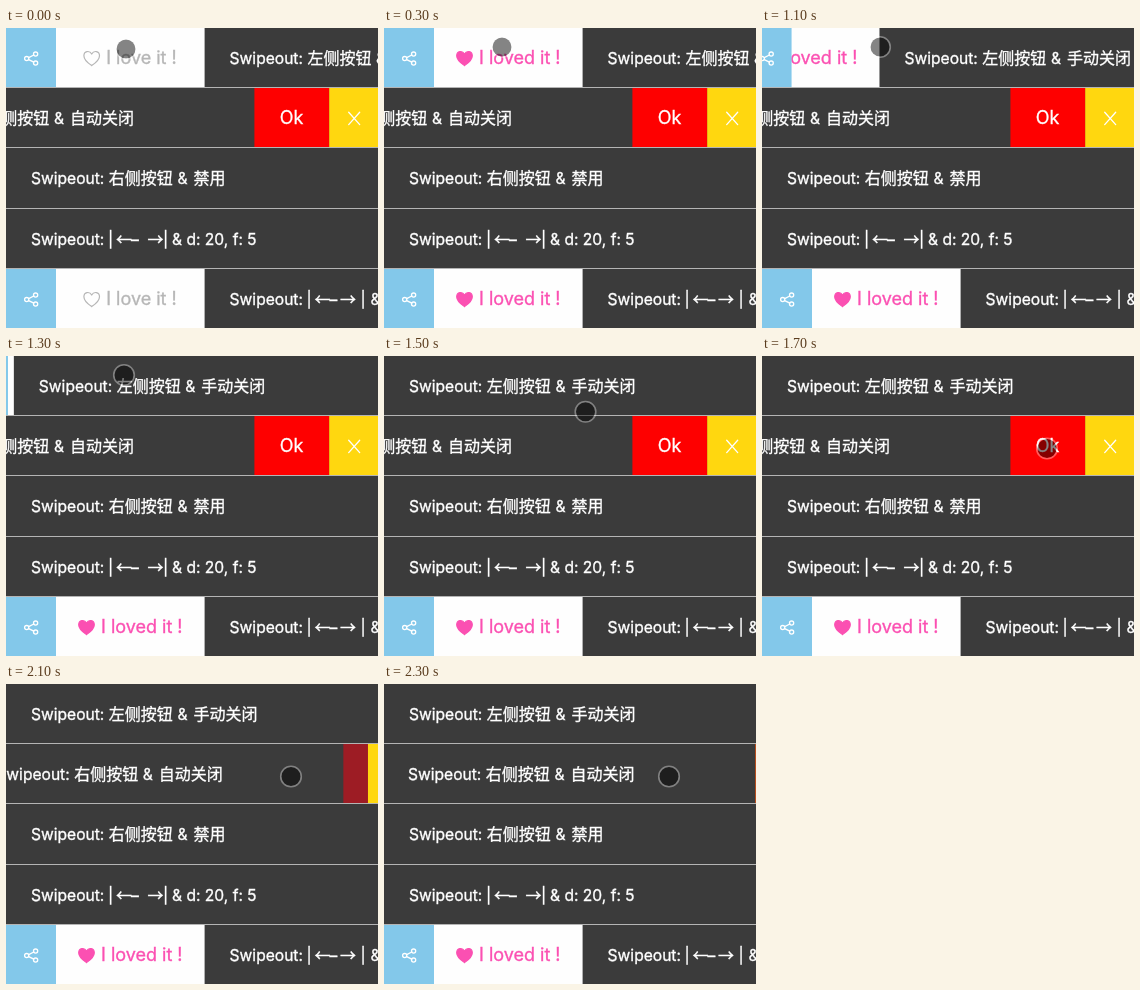
Recreate the animation shown at these times as an HTML page with a canvas. Size 372x300 px, loop 2.4 s.

```html
<!DOCTYPE html>
<html lang="zh-CN">
<head>
<meta charset="utf-8">
<title>Swipeout</title>
<style>
html, body { margin: 0; width: 100%; height: 100%; overflow: hidden; background: #3b3b3b; }
canvas { display: block; }
</style>
</head>
<body>
<canvas id="stage" width="372" height="300"></canvas>
<script>
const ctx = document.getElementById('stage').getContext('2d');
const W = 372, LOOP = 2400, STEP = 100;
const LEFT = 198.6, RIGHT = 123.6, PITCH = 60.3, ROW = 59;
const LATIN = 'Inter, sans-serif';
const HAN = '"Noto Sans CJK SC", "Noto Sans CJK", sans-serif';
const PINK = '#fb50b2', GREY = '#b6b6b6';

// Each label is a list of [x, text] pieces.
const zh = (a, b) => [[25, 'Swipeout:'], [102.8, a], [171.5, '&'], [187.5, b]];
const arrows = (head, bar) => [
  [25, 'Swipeout:'], [102, '|'], [110, '←'], [125, '–'], [head, '→'], [bar, '|'],
  [166, '& d: 20, f: 5']
];
const labels = [
  zh('左侧按钮', '手动关闭'),
  zh('右侧按钮', '自动关闭'),
  zh('右侧按钮', '禁用'),
  arrows(141.5, 157),
  arrows(135.5, 156)
];

const clamp = v => Math.min(1, Math.max(0, v));
const mix = (a, b, p) => a + (b - a) * p;
const smooth = p => p * p * (3 - 2 * p);

// CSS "ease": cubic-bezier(.25, .1, .25, 1)
function ease(x) {
  x = clamp(x);
  const bez = (a, b, s) => 3 * a * s * (1 - s) ** 2 + 3 * b * s * s * (1 - s) + s ** 3;
  let lo = 0, hi = 1;
  for (let i = 0; i < 24; i++) {
    const mid = (lo + hi) / 2;
    if (bez(.25, .25, mid) < x) lo = mid; else hi = mid;
  }
  return bez(.1, 1, lo);
}

function box(x, y, w, h, color) {
  ctx.fillStyle = color;
  ctx.fillRect(x, y, w, h);
}

function text(str, x, y, size, color, family = LATIN) {
  ctx.font = `${size}px ${family}`;
  ctx.fillStyle = ctx.strokeStyle = color;
  ctx.lineWidth = .35;
  ctx.fillText(str, x, y);
  ctx.strokeText(str, x, y);
}

function label(pieces, x, y) {
  for (const [dx, str] of pieces) {
    const han = /[←→一-龥]/.test(str);
    text(str, x + dx, y, han ? 16 : 15.6, '#fff', han ? HAN : LATIN);
  }
}

function disc(x, y, r) {
  ctx.beginPath();
  ctx.arc(x, y, r, 0, 7);
}

function heart(x, y, filled) {
  ctx.beginPath();
  ctx.moveTo(x, y + 7);
  for (const s of [-1, 1]) {
    ctx.moveTo(x, y + 7);
    ctx.bezierCurveTo(x + s * 4, y + 4.4, x + s * 7.8, y + 1, x + s * 7.8, y - 2.8);
    ctx.bezierCurveTo(x + s * 7.8, y - 8, x + s * 2, y - 8.3, x, y - 4.6);
  }
  ctx.lineWidth = 1.2;
  ctx.lineCap = 'round';
  ctx.fillStyle = PINK;
  ctx.strokeStyle = filled ? PINK : GREY;
  if (filled) ctx.fill();
  ctx.stroke();
}

function shareIcon(x, y) {
  ctx.strokeStyle = '#fff';
  ctx.lineWidth = 1.3;
  for (const [dx, dy] of [[-4.3, 0], [4.6, -4.5], [4.6, 4.5]]) {
    disc(x + dx, y + dy, 2.1);
    ctx.stroke();
  }
  ctx.beginPath();
  for (const s of [-1, 1]) {
    ctx.moveTo(x - 2.3, y + s);
    ctx.lineTo(x + 2.8, y + s * 3.6);
  }
  ctx.stroke();
}

function crossIcon(x, y) {
  ctx.strokeStyle = '#fff';
  ctx.lineWidth = 1.3;
  ctx.beginPath();
  for (const s of [-1, 1]) {
    ctx.moveTo(x - 5.5, y - 6.2 * s);
    ctx.lineTo(x + 5.5, y + 6.2 * s);
  }
  ctx.stroke();
}

function leftButtons(top, offset, loved) {
  const mid = top + 30, x = offset - 149, share = 50 * offset / LEFT - 50;
  const pad = loved ? 22.4 : 27.6;
  box(x, top, 149, ROW, '#fefefe');
  heart(x + pad + 8.5, mid + .6, loved);
  text(loved ? 'I loved it !' : 'I love it !', x + pad + 23, mid + 6, 18, loved ? PINK : GREY);
  box(share, top, 50, ROW, '#83c8ea');
  shareIcon(share + 25, mid + .6);
}

function rightButtons(top, closed, pressed) {
  const mid = top + 30, ok = W - RIGHT * (1 - closed), cancel = mix(323.2, W, closed ** .7);
  box(ok, top, 75, ROW, pressed ? '#9d1c24' : '#fe0000');
  text('Ok', ok + 25.3, mid + 5.5, 18, '#fff');
  box(cancel, top, 50, ROW, '#ffd70f');
  crossIcon(cancel + 25, mid + .4);
}

function cursor(t) {
  const near = clamp(t / 200), go = smooth(clamp((t - 1300) / 400));
  const x = mix(mix(120, 118, near), 285, go), y = mix(mix(21, 19, near), 92.5, go);
  disc(x, y, 9.5);
  ctx.fillStyle = 'rgba(0,0,0,.48)';
  ctx.fill();
  disc(x, y, 10.3);
  ctx.lineWidth = 1.6;
  ctx.strokeStyle = 'rgba(255,255,255,.36)';
  ctx.stroke();
}

function draw(t) {
  const loved = t >= 200;
  const leftOpen = LEFT * (1 - ease((t - 1000) / 400));
  const closed = ease((t - 1912) / 440);
  const offsets = [leftOpen, -RIGHT * (1 - closed), 0, 0, LEFT];

  box(0, 0, W, 300, '#3b3b3b');
  offsets.forEach((offset, i) => {
    const top = Math.round(i * PITCH - .25);
    box(0, top - 1, W, 1, '#b4b4b4');
    label(labels[i], offset, top + 35.5);
    if (offset > 0) leftButtons(top, offset, loved);
    if (offset < 0) rightButtons(top, closed, t >= 1900);
  });
  cursor(t);
}

const start = performance.now();
function tick() {
  const t = (performance.now() - start) % LOOP;
  draw(Math.floor(t / STEP) * STEP);
  requestAnimationFrame(tick);
}
tick();
</script>
</body>
</html>
```
